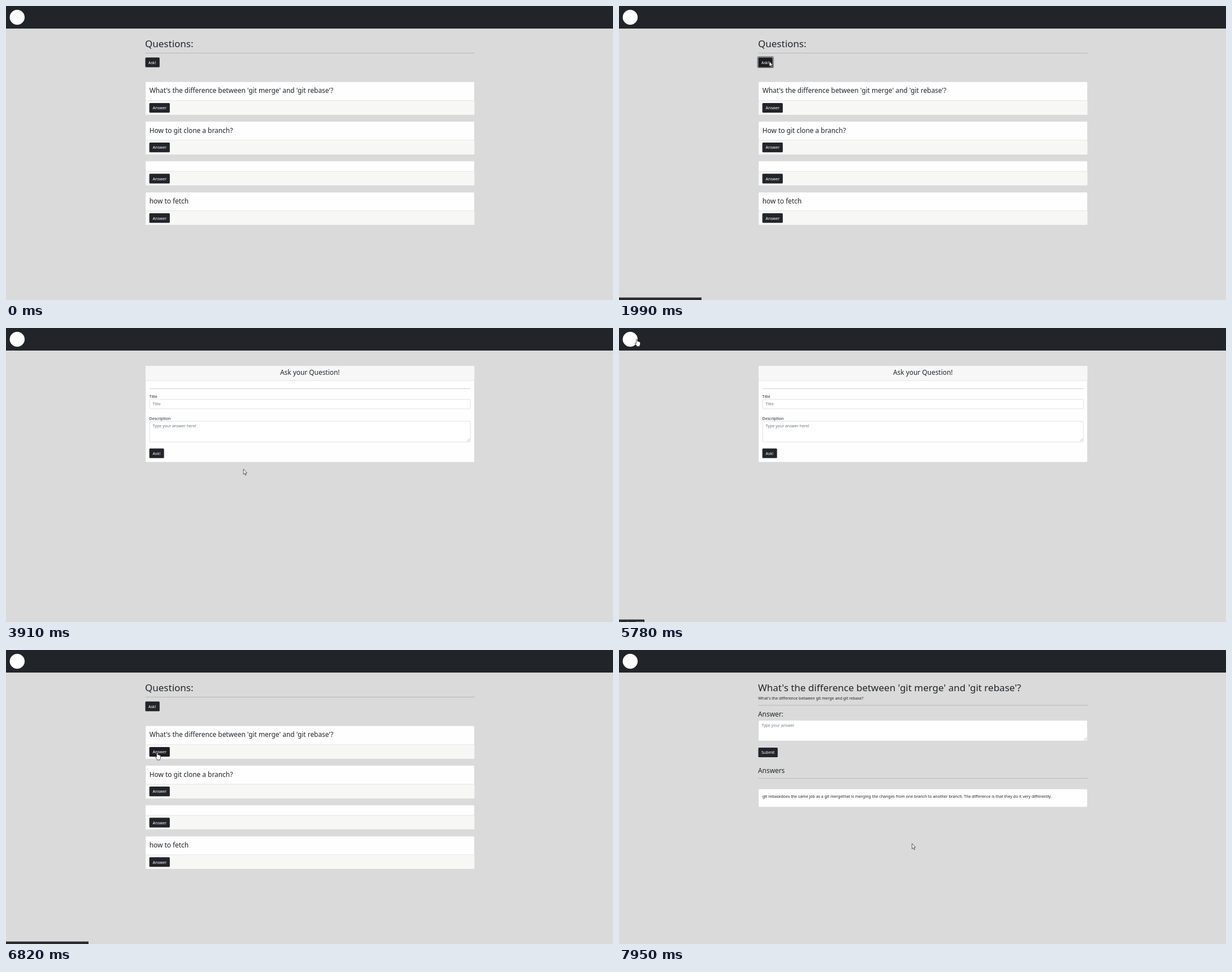
These frames come from a looping animation (1074x521 px, 8 s). An HTML page:

```html
<!DOCTYPE html>
<html lang="en">
<head>
<meta charset="utf-8">
<title>Questions</title>
<style>
html, body { margin: 0; width: 100%; height: 100%; overflow: hidden; background: #dadada; }
svg { display: block; width: 1074px; height: 521px; }
text { font-family: "Noto Sans", "Open Sans", sans-serif; fill: #212529; white-space: pre; }
</style>
</head>
<body>
<svg id="stage" viewBox="0 0 1074 521" xmlns="http://www.w3.org/2000/svg"></svg>
<script>
const NS = 'http://www.w3.org/2000/svg';
const stage = document.getElementById('stage');
const DARK = '#212529', H1 = 17, H3 = 11.9, BODY = 7.02;

function add(parent, tag, attrs = {}) {
  const el = document.createElementNS(NS, tag);
  for (const k in attrs) el.setAttribute(k, attrs[k]);
  parent.appendChild(el);
  return el;
}
const rect = (g, x, y, x2, y2, fill, more) =>
  add(g, 'rect', { x, y, width: x2 - x, height: y2 - y, fill, ...more });
function text(g, x, y, size, str, more) {
  add(g, 'text', { x, y, 'font-size': size, ...more }).textContent = str;
}
const rule = (g, x, x2, y, fill = '#aeafb0') => rect(g, x, y, x2, y + 0.8, fill);
const panel = (g, y, y2) =>
  rect(g, 246.8, y, 828.8, y2, '#fefefe', { rx: 1.5, stroke: '#d0d0d0', 'stroke-width': 0.5 });
function button(g, x, y, x2, y2, label, tx) {
  const box = rect(g, x, y, x2, y2, DARK, { rx: 1.5 });
  text(g, tx, y + 11.3, BODY, label, { style: 'fill:#fff' });
  return { box, x, y, x2, y2 };
}
function field(g, x, y, x2, y2, hint, color, grip) {
  rect(g, x + 0.3, y + 0.3, x2 - 0.3, y2 - 0.3, '#fff', { rx: 1.7, stroke: '#ced4da', 'stroke-width': 0.7 });
  text(g, x + 5.8, y + 11.4, BODY, hint, { style: 'fill:' + color });
  if (grip) add(g, 'path', {
    d: `M${x2 - 6.5} ${y2 - 1.5}l5-5M${x2 - 3.5} ${y2 - 1.5}l2-2`, stroke: '#8c8c8c', 'stroke-width': 0.6
  });
}

// List of questions
const list = add(stage, 'g');
text(list, 246, 73, H1, 'Questions:');
rule(list, 246.5, 829, 83);
const ring = rect(list, 245.3, 89.8, 273.2, 109.2, 'none', { rx: 2.5, stroke: '#7e8082', 'stroke-width': 1.7 });
const ask = button(list, 246.5, 91.2, 271.8, 108.4, 'Ask!', 252);
const answers = [
  [134.3, 167.4, 193, "What's the difference between 'git merge' and 'git rebase'?"],
  [204.6, 237.5, 263.3, 'How to git clone a branch?'],
  [274.8, 292.7, 318, ''],
  [330, 362.6, 388, 'how to fetch']
].map(([y, mid, y2, title]) => {
  panel(list, y, y2);
  rect(list, 247, mid, 828.6, y2 - 0.2, '#f7f7f6');
  rule(list, 247, 828.6, mid, '#dfdfdf');
  text(list, 253.7, y + 20.1, H3, title);
  return button(list, 253.6, mid + 4.6, 289.8, mid + 21.7, 'Answer', 259.6);
});

// Form for a new question
const form = add(stage, 'g');
panel(form, 67, 237.8);
rect(form, 247, 67.2, 828.6, 93, '#f7f7f7');
rule(form, 247, 828.6, 92.8, '#dfdfdf');
text(form, 537.7, 83.3, H3, 'Ask your Question!', { 'text-anchor': 'middle' });
rule(form, 253.8, 822, 107, '#c6c7c8');
text(form, 253.6, 123.6, BODY, 'Title');
field(form, 253.8, 126, 822, 143.4, 'Title', '#6c757d');
text(form, 253.6, 162.5, BODY, 'Description');
field(form, 253.8, 165, 822, 202.4, 'Type your answer here!', '#6c757d', true);
button(form, 253.6, 213.6, 279.6, 230.4, 'Ask!', 259.6);

// Question with its answers
const detail = add(stage, 'g');
text(detail, 246, 73, H1, "What's the difference between 'git merge' and 'git rebase'?");
text(detail, 246.3, 88.4, BODY, "What's the difference between git merge and git rebase?");
rule(detail, 246.5, 829, 97.6);
text(detail, 246, 118.3, H3, 'Answer:');
field(detail, 246.4, 124.4, 829, 161.4, 'Type your answer', '#6b8187', true);
const submit = button(detail, 246.5, 173, 280.8, 190, 'Submit', 252);
text(detail, 246, 217.6, H3, 'Answers');
rule(detail, 246.5, 829, 227);
panel(detail, 246.2, 278.2);
text(detail, 253.7, 262.1, BODY, 'git rebasedoes the same job as a git mergethat is merging the changes ' +
  'from one branch to another branch. The difference is that they do it very differently.');

// Top bar, status bar
rect(stage, 0, 0, 1074, 40, DARK);
add(stage, 'circle', { cx: 19.8, cy: 20, r: 13.2, fill: '#fff' });
const wideStatus = rect(stage, 0, 516.6, 146, 521, '#2b2b2d');
const status = add(stage, 'g');
rect(status, 0, 516.6, 45, 521, '#2b2b2d');
text(status, 2, 524.4, 6.1, 'localhost:3000', { style: 'fill:#e4e4e4' });

// Pointer shapes, each with its hot spot at 0,0
const pointer = add(stage, 'g');
const skin = { fill: '#fff', stroke: '#26282b', 'stroke-width': 0.75, 'stroke-linejoin': 'round' };
const shapes = {
  arrow: add(pointer, 'path', { d: 'M.2 0V9.3L2.2 7.4 3.7 10.9 5.1 10.3 3.6 6.9H6.4Z', ...skin }),
  hand: add(pointer, 'path', {
    d: 'M-1 1Q0-.8 1 1V4.2Q2.4 3.6 2.8 4.7 4 4.2 4.4 5.3 5.9 5 6 6.4V9.2Q5.7 11.3 4.7 12.2V13.4H-.4V12.2' +
       'L-3.2 8.4Q-3.6 6.9-2.2 7.1L-1 8.3Z', ...skin }),
  beam: add(pointer, 'path', { d: 'M-1.6-4.4H1.6M0-4.4V4.4M-1.6 4.4H1.6', stroke: '#26282b', 'stroke-width': 0.8 })
};

const LOOP = 8000;
// Bursts of updates: start, end, count
const bursts = [
  [350, 1120, 11], [1200, 1990, 11], [2070, 2230, 3], [2540, 3340, 11],
  [3430, 4150, 10], [4260, 5060, 11], [5130, 5380, 4], [5530, 6260, 10],
  [6340, 6500, 3], [6670, 6980, 5], [7130, 7870, 10], [7950, 7950, 1]
];
// Pointer path: time, x, y
const track = [
  [350, 1064, 508], [735, 500, 418], [1120, 221, 150],
  [1280, 228, 115], [1500, 240, 52], [1600, 248, 51], [1830, 265, 94], [1910, 265.8, 98],
  [2460, 265.8, 98], [2900, 385, 117], [3340, 514, 143],
  [3590, 606, 172], [3750, 535, 212], [3910, 420, 250], [4150, 292, 292],
  [4660, 150, 150], [5060, 48, 22], [5380, 31.6, 19.4],
  [5860, 31.6, 19.4], [6100, 173, 115], [6260, 241.5, 171],
  [6500, 267.6, 181.5], [7050, 267.6, 181.5], [7210, 256, 186], [7380, 300, 215],
  [7700, 470, 315], [7870, 516.5, 343], [7950, 518.3, 343]
];

function snap(t) {
  let last = 0;
  for (const [a, b, n] of bursts) {
    if (t < a) break;
    const step = n > 1 ? (b - a) / (n - 1) : 1;
    last = a + Math.min(n - 1, Math.floor((t - a) / step + 1e-6)) * step;
  }
  return last;
}
function locate(t) {
  const i = track.findIndex(p => p[0] > t);
  if (i < 0) return track[track.length - 1].slice(1);
  if (i === 0) return track[0].slice(1);
  const [t0, x0, y0] = track[i - 1], [t1, x1, y1] = track[i];
  const u = (t - t0) / (t1 - t0);
  return [x0 + (x1 - x0) * u, y0 + (y1 - y0) * u];
}
const inside = (x, y, b) => x >= b.x && x <= b.x2 && y >= b.y && y <= b.y2;
const area = (x, y, x2, y2) => ({ x, y, x2, y2 });
const logo = area(0, 6, 42, 34);
const fields = [area(254, 126, 822, 143.4), area(254, 165, 822, 202.4)];
const show = (el, on) => el.setAttribute('visibility', on ? 'visible' : 'hidden');

function draw(t) {
  const [x, y] = locate(snap(t));
  const page = t < 2070 ? list : t < 5860 ? form : t < 6900 ? list : detail;
  for (const p of [list, form, detail]) p.setAttribute('display', p === page ? 'inline' : 'none');

  const links = page === list ? [ask, ...answers] : page === detail ? [submit] : [];
  let hot = false;
  for (const b of links) {
    const over = t >= 350 && inside(x, y, b);
    b.box.setAttribute('fill', over ? '#1a1d21' : DARK);
    hot = hot || over;
  }
  const clicked = t >= 1910 && t < 2070;
  ring.setAttribute('display', clicked ? 'inline' : 'none');
  show(wideStatus, (t >= 1750 && t < 2070) || (t >= 6670 && t < 6900));
  show(status, t >= 5530 && t < 5860);

  let kind = 'arrow';
  if ((hot && !clicked) || inside(x, y, logo)) kind = 'hand';
  else if (page === form && fields.some(f => inside(x, y, f))) kind = 'beam';
  for (const k in shapes) show(shapes[k], t >= 350 && k === kind);
  pointer.setAttribute('transform', `translate(${x.toFixed(2)} ${y.toFixed(2)})`);
}

const start = performance.now();
function tick() {
  draw((performance.now() - start) % LOOP);
  requestAnimationFrame(tick);
}
draw(0);
requestAnimationFrame(tick);
</script>
</body>
</html>
```
